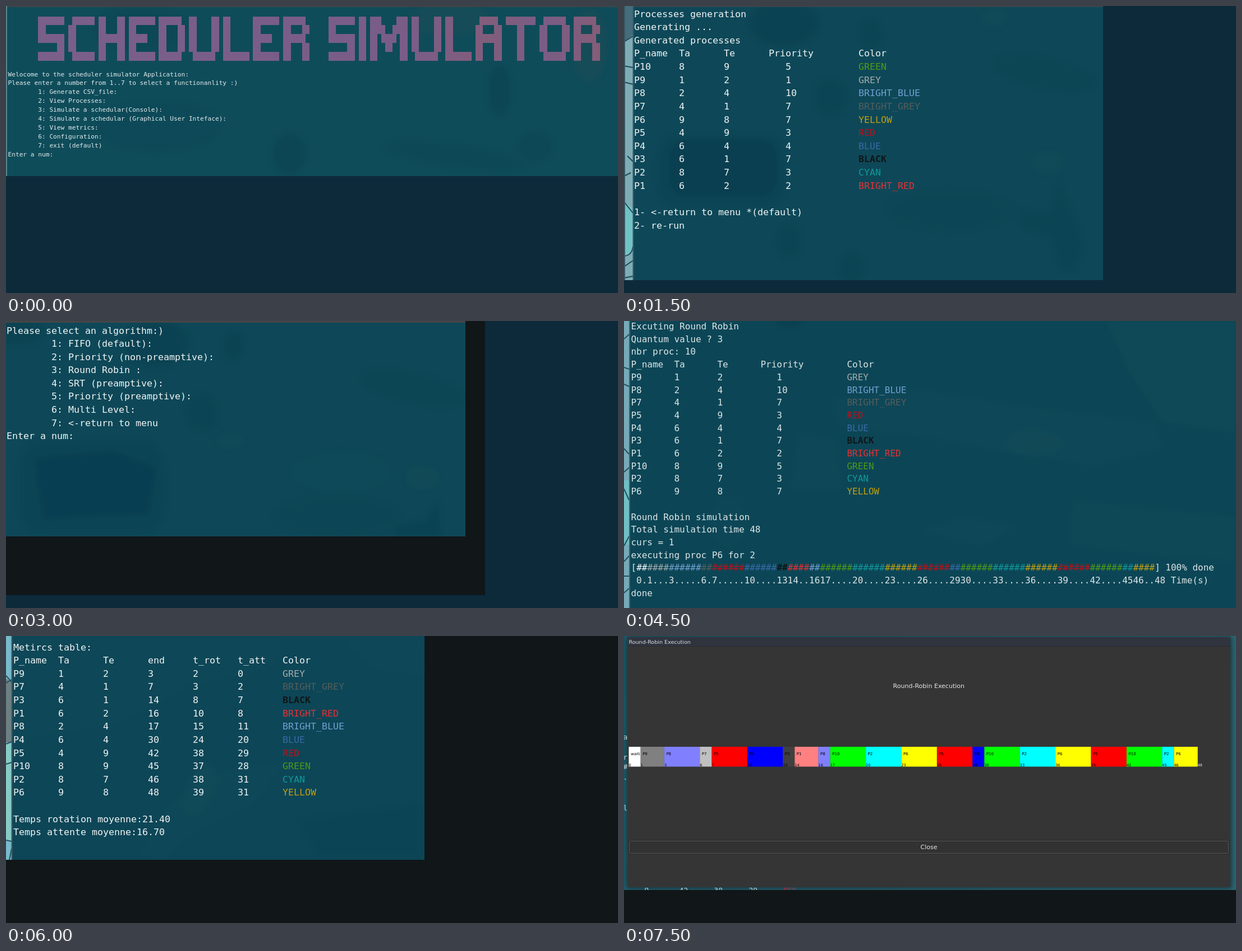
Animation, 1091 px wide and 513 px high, one loop 9 s. Source, as an HTML page:

```html
<!DOCTYPE html>
<html lang="en">
<head>
<meta charset="utf-8">
<title>Scheduler simulator</title>
<style>
  html, body { margin: 0; width: 100%; height: 100%; overflow: hidden; background: #0d2a3b; }
  section {
    position: absolute; left: 0; top: 0; width: 1091px; height: 513px;
    overflow: hidden; background: #0d2a3b;
    animation: show 9s step-end infinite;
    animation-delay: calc((var(--i) - 6) * 1.5s);
  }
  @keyframes show {
    0% { opacity: 1; }
    16.67%, 100% { opacity: 0; }
  }
  svg { position: absolute; left: 0; top: 0; display: block; overflow: hidden; }
  pre {
    position: absolute; margin: 0; color: #f0f5f5;
    font-family: "DejaVu Sans Mono", "Noto Sans Mono", monospace;
    font-size: 16.61px; line-height: 23.63px;
  }
  #menu pre { left: 3.5px; top: 114.5px; font-size: 11.16px; line-height: 15.89px; color: #e2ecec; }
  #generate pre { left: 18px; top: 2.6px; }
  #choose pre { left: 1px; top: 5.6px; line-height: 23.56px; }
  #run pre { left: 12.5px; top: -1px; font-size: 15.99px; line-height: 22.71px; color: #dce6e7; }
  #metrics pre { left: 13px; top: 8.6px; }
  #chart text { font-family: "DejaVu Sans", sans-serif; }
  .soft { filter: blur(4px); }
  g.soft { opacity: .6; }
</style>
</head>
<body>

<section id="menu" style="--i:0">
  <svg width="1091" height="304">
    <defs>
      <linearGradient id="ink">
        <stop offset="0" stop-color="#7a5f89"/>
        <stop offset=".65" stop-color="#795d87"/>
        <stop offset=".8" stop-color="#825d7c"/>
        <stop offset=".9" stop-color="#795d85"/>
        <stop offset="1" stop-color="#855d78"/>
      </linearGradient>
    </defs>
    <rect width="1091" height="304" fill="#0f4c5a"/>
    <g class="soft">
      <ellipse cx="240" cy="42" rx="85" ry="38" fill="#0d4756"/>
      <ellipse cx="270" cy="215" rx="110" ry="42" fill="#0c4857"/>
      <ellipse cx="505" cy="265" rx="30" ry="36" fill="#0b4353"/>
      <ellipse cx="800" cy="268" rx="125" ry="18" fill="#0c4756" transform="rotate(8 800 268)"/>
      <ellipse cx="880" cy="150" rx="20" ry="46" fill="#0b4353"/>
      <ellipse cx="942" cy="252" rx="30" ry="26" fill="#0c4655"/>
      <ellipse cx="790" cy="25" rx="75" ry="30" fill="#1a4d58"/>
      <ellipse cx="1040" cy="70" rx="32" ry="65" fill="#1c4d56"/>
    </g>
    <rect width="1091" height="2" fill="#3c4546"/>
    <rect width="2" height="304" fill="#5b8790"/>
    <path id="title" fill="url(#ink)" shape-rendering="crispEdges"/>
  </svg>
<pre>Welocome to the scheduler simulator Application:
Please enter a number from 1..7 to select a functionanlity :)
        1: Generate CSV_file:
        2: View Processes:
        3: Simulate a schedular(Console):
        4: Simulate a schedular (Graphical User Inteface):
        5: View metrics:
        6: Configuration:
        7: exit (default)
Enter a num:</pre>
</section>

<section id="generate" style="--i:1">
  <svg width="854" height="490">
    <rect width="854" height="490" fill="#0e4858"/>
    <g class="soft">
      <ellipse cx="285" cy="30" rx="62" ry="42" fill="#0a4050"/>
      <ellipse cx="440" cy="50" rx="20" ry="26" fill="#0b4352"/>
      <ellipse cx="368" cy="163" rx="28" ry="32" fill="#0b4352"/>
      <ellipse cx="750" cy="120" rx="90" ry="25" fill="#0c4553" transform="rotate(12 750 120)"/>
      <rect x="62" y="230" width="224" height="130" rx="40" fill="#0b4353"/>
      <rect x="82" y="240" width="190" height="100" rx="28" fill="#073b4c"/>
      <ellipse cx="755" cy="280" rx="28" ry="20" fill="#134b57"/>
      <ellipse cx="660" cy="20" rx="22" ry="16" fill="#134b58"/>
      <path d="M705 365L760 375L775 320L795 360L820 430L800 475L775 465L760 410L710 395Z" fill="#0b4352"/>
      <ellipse cx="295" cy="420" rx="20" ry="30" fill="#0b4352"/>
      <ellipse cx="405" cy="468" rx="22" ry="28" fill="#0b4352"/>
      <ellipse cx="580" cy="365" rx="110" ry="34" fill="#0d4554"/>
    </g>
    <rect width="854" height="2" fill="#36474c"/>
    <path d="M0 0H16V490H0Z" fill="#7eadb6"/>
    <path d="M0 0H16V52L0 64Z" fill="#456d7c"/>
    <path d="M0 350L16 362V440L0 446Z" fill="#72c3c5"/>
    <path d="M0 64L16 54M0 107L16 110M0 136L16 140M6 268L16 278M0 304L12 298M0 350L16 370M0 447Q14 446 16 430M0 466L16 455M0 486L16 483" fill="none" stroke="#1e4857" stroke-width="2"/>
    <path d="M1 0V490M16.5 0V490" stroke="#3b5965" stroke-width="2"/>
  </svg>
  <pre></pre>
</section>

<section id="choose" style="--i:2">
  <svg width="854" height="490">
    <rect width="854" height="490" fill="#111618"/>
    <rect width="819" height="385" fill="#0e4858"/>
    <g class="soft">
      <ellipse cx="268" cy="40" rx="58" ry="42" fill="#0a4050"/>
      <ellipse cx="20" cy="18" rx="50" ry="24" fill="#0a4151"/>
      <ellipse cx="405" cy="45" rx="18" ry="25" fill="#0a4150"/>
      <ellipse cx="350" cy="163" rx="28" ry="32" fill="#0b4352"/>
      <ellipse cx="725" cy="120" rx="92" ry="25" fill="#0c4553" transform="rotate(12 725 120)"/>
      <rect x="25" y="215" width="258" height="164" rx="42" fill="#0b4454"/>
      <path d="M50 245L190 232L268 262L255 345L65 355Z" fill="#063a4d"/>
      <ellipse cx="600" cy="270" rx="88" ry="36" fill="#104b5a"/>
      <ellipse cx="742" cy="280" rx="28" ry="20" fill="#154c57"/>
      <ellipse cx="400" cy="215" rx="24" ry="12" fill="#134b58"/>
      <path d="M690 365L750 358L770 320L776 383H695Z" fill="#094050"/>
      <ellipse cx="590" cy="350" rx="110" ry="34" fill="#0d4554"/>
    </g>
    <path d="M0 385H854V490H0ZM819 0H854V490H819Z" fill="#111618"/>
    <rect width="819" height="3" fill="#434646"/>
  </svg>
<pre>Please select an algorithm:)
        1: FIFO (default):
        2: Priority (non-preamptive):
        3: Round Robin :
        4: SRT (preamptive):
        5: Priority (preamptive):
        6: Multi Level:
        7: &lt;-return to menu
Enter a num:</pre>
</section>

<section id="run" style="--i:3">
  <svg width="1091" height="513">
    <rect width="1091" height="513" fill="#0c4656"/>
    <g class="soft">
      <path d="M860 0H1091V200L960 180L900 90Z" fill="#124c59"/>
      <path d="M370 140L520 120L700 150L950 180L960 230L840 260L700 240L540 210L380 190Z" fill="#104958"/>
      <path d="M310 200L380 210L390 300L295 305Z" fill="#104958"/>
      <ellipse cx="730" cy="218" rx="50" ry="22" fill="#154c58"/>
      <path d="M800 320L1091 350V430L960 420L790 400Z" fill="#104a58"/>
      <path d="M525 375L600 350L705 362L640 405Z" fill="#104958"/>
      <ellipse cx="185" cy="360" rx="35" ry="45" fill="#0f4958"/>
      <ellipse cx="295" cy="3" rx="24" ry="8" fill="#093c4b"/>
    </g>
    <rect width="9" height="513" fill="#77aab8"/>
    <rect y="285" width="9" height="115" fill="#70bfc4"/>
    <path d="M0 32L9 24M0 83L9 86M0 113L9 117M0 228L9 238M0 270L9 262M0 300L9 320M0 402L9 385M0 430L9 420M0 456H9M0 486L9 478" stroke="#24505f" stroke-width="2"/>
    <path d="M10 0V513" stroke="#435f6b" stroke-width="2"/>
  </svg>
  <pre></pre>
</section>

<section id="metrics" style="--i:4">
  <svg width="1091" height="513">
    <rect width="1091" height="513" fill="#111618"/>
    <rect width="746" height="400" fill="#0d4657"/>
    <g class="soft">
      <path d="M10 4H500L480 60L330 90L200 160L15 190Z" fill="#0f4958"/>
      <path d="M240 390L290 300L400 235L500 225L440 300L340 350L280 395Z" fill="#104a59"/>
      <path d="M600 4H742V70L660 60Z" fill="#104a59"/>
      <ellipse cx="345" cy="275" rx="26" ry="50" fill="#124c5a" transform="rotate(25 345 275)"/>
      <path d="M520 330L740 300V394H560Z" fill="#0b4454"/>
    </g>
    <path d="M0 0H10V400H0Z" fill="#78b9cb"/>
    <path d="M0 76L10 82V190H0Z" fill="#6c7f81"/>
    <path d="M0 192H10V366H0Z" fill="#86cbc5"/>
    <path d="M0 71L10 82M0 84L10 78M0 193L10 189M0 229L10 226M0 365L10 367M6 400L10 380" stroke="#24505f" stroke-width="2"/>
    <path d="M10.5 0V400" stroke="#3d5a66" stroke-width="2"/>
  </svg>
  <pre></pre>
</section>

<section id="chart" style="--i:5">
  <svg width="1091" height="513">
    <defs>
      <linearGradient id="desk" x2="1" y2=".3">
        <stop offset="0" stop-color="#1c5867"/>
        <stop offset=".6" stop-color="#255f70"/>
        <stop offset="1" stop-color="#2b6672"/>
      </linearGradient>
    </defs>
    <rect width="1091" height="513" fill="#111618"/>
    <rect width="1091" height="454" fill="url(#desk)"/>
    <rect x="5" y="2" width="1078" height="449" rx="3" fill="#17343c" class="soft"/>
    <svg width="1091" height="454">
      <g id="behind" font-size="12.9"></g>
    </svg>
    <rect y="454" width="1091" height="59" fill="#111618"/>
    <rect x="7" y="2" width="1074" height="447" fill="#353535"/>
    <rect x="7" y="2" width="1074" height="16" fill="#2f343f"/>
    <path d="M7 18.5H1081" stroke="#292c33"/>
    <text x="8.5" y="14" font-size="9.55" fill="#dcdfe2">Round-Robin Execution</text>
    <text x="543.3" y="93" font-size="11.04" fill="#e6e6e6" text-anchor="middle">Round-Robin Execution</text>
    <g id="bars"></g>
    <rect x="8.5" y="365.5" width="1070" height="24" rx="2" fill="none" stroke="#2a2a2a"/>
    <rect x="9.5" y="366.5" width="1068" height="22" rx="2" fill="#323232" stroke="#575757"/>
    <text x="543.6" y="381.3" font-size="11.04" fill="#e6e6e6" text-anchor="middle">Close</text>
  </svg>
</section>

<script>
const $ = sel => document.querySelector(sel);

// Banner: five rows of character cells per letter.
const same = (row, n) => Array(n).fill(row).join('/');
const glyphs = {
  S: '███████/██     /███████/     ██/███████',
  C: ' ██████/' + same('██     ', 3) + '/ ██████',
  H: '██   ██/██   ██/███████/██   ██/██   ██',
  E: '███████/██     /█████  /██     /███████',
  D: '██████ /' + same('██   ██', 3) + '/██████ ',
  U: same('██    ██', 4) + '/ ██████ ',
  L: same('██     ', 4) + '/███████',
  R: '██████ /██   ██/██████ /██   ██/██   ██',
  I: same('██', 5),
  M: '███    ███/████  ████/██ ████ ██/██  ██  ██/██      ██',
  A: ' █████ /██   ██/███████/██   ██/██   ██',
  T: '████████/' + same('   ██   ', 4),
  O: ' ██████ /' + same('██    ██', 3) + '/ ██████ ',
  ' ': same('   ', 5)
};
const cellW = 6.72, cellH = 15.89;
let banner = '';
for (let row = 0; row < 5; row++) {
  const line = [...'SCHEDULER SIMULATOR'].map(c => glyphs[c].split('/')[row]).join(' ');
  for (const run of line.matchAll(/█+/g)) {
    const w = run[0].length * cellW;
    banner += `M${57.3 + run.index * cellW} ${18.5 + row * cellH}h${w}v${cellH}h${-w}z`;
  }
}
$('#title').setAttribute('d', banner);

// name, arrival, execution time, priority, colour name
const procs = [
  ['P10', 8, 9, 5, 'GREEN'], ['P9', 1, 2, 1, 'GREY'], ['P8', 2, 4, 10, 'BRIGHT_BLUE'],
  ['P7', 4, 1, 7, 'BRIGHT_GREY'], ['P6', 9, 8, 7, 'YELLOW'], ['P5', 4, 9, 3, 'RED'],
  ['P4', 6, 4, 4, 'BLUE'], ['P3', 6, 1, 7, 'BLACK'], ['P2', 8, 7, 3, 'CYAN'],
  ['P1', 6, 2, 2, 'BRIGHT_RED']
].map(([name, ta, te, prio, color]) => ({ name, ta, te, prio, color }));

const ansi = {
  GREEN: '#4e9a16', GREY: '#a3abab', BRIGHT_BLUE: '#729fcf', BRIGHT_GREY: '#555d5b',
  YELLOW: '#c0a010', RED: '#c01018', BLUE: '#3869a6', BLACK: '#101618',
  CYAN: '#10999b', BRIGHT_RED: '#ea2f31', WHITE: '#ffffff'
};
const fills = {
  waiti: '#fff', P9: '#808080', P8: '#8080ff', P7: '#c0c0c0', P5: '#f00', P4: '#00f',
  P3: '#404040', P1: '#ff8080', P10: '#0f0', P2: '#0ff', P6: '#ff0'
};

let clock = 0;
const slots = ('waiti:1 P9:2 P8:3 P7:1 P5:3 P4:3 P3:1 P1:2 P8:1 P10:3 P2:3 P6:3 ' +
  'P5:3 P4:1 P10:3 P2:3 P6:3 P5:3 P10:3 P2:1 P6:2').split(' ').map(s => {
  const [name, len] = s.split(':');
  const slot = { name, start: clock, len: +len };
  clock += slot.len;
  return slot;
});
for (const p of procs) {
  const last = slots.filter(s => s.name === p.name).pop();
  p.end = last.start + last.len;
  p.rot = p.end - p.ta;
  p.att = p.rot - p.te;
}

const paint = (text, color) =>
  `<span style="color:${ansi[color]}${color === 'BLACK' ? ';font-weight:bold' : ''}">${text}</span>`;
const cols = list => list.map(v => String(v).padEnd(8)).join('');
const listing = rows => [
  cols(['P_name', 'Ta', 'Te', 'Priority', '']) + 'Color',
  ...rows.map(p => cols([p.name, p.ta, p.te, '   ' + p.prio, '']) + paint(p.color, p.color))
];
const by = key => [...procs].sort((a, b) => a[key] - b[key]);
const mean = key => (procs.reduce((sum, p) => sum + p[key], 0) / procs.length).toFixed(2);
const print = (id, lines) => { $(`#${id} pre`).innerHTML = lines.join('\n'); };

print('generate', [
  'Processes generation', 'Generating ...', 'Generated processes',
  ...listing(procs), '', '1- &lt;-return to menu *(default)', '2- re-run'
]);

const colorOf = name => (procs.find(p => p.name === name) || { color: 'WHITE' }).color;
print('run', [
  'Excuting Round Robin', 'Quantum value ? 3', 'nbr proc: 10',
  ...listing(by('ta')), '',
  'Round Robin simulation', `Total simulation time ${clock}`, 'curs = 1', 'executing proc P6 for 2',
  '[' + slots.map(s => paint('#'.repeat(2 * s.len), colorOf(s.name))).join('') + '] 100% done',
  ' ' + slots.map(s => String(s.start).padEnd(2 * s.len, '.')).join('') + clock + ' Time(s)',
  'done'
]);

print('metrics', [
  'Metircs table:',
  cols(['P_name', 'Ta', 'Te', 'end', 't_rot', 't_att']) + 'Color',
  ...by('end').map(p => cols([p.name, p.ta, p.te, p.end, p.rot, p.att]) + paint(p.color, p.color)),
  '', `Temps rotation moyenne:${mean('rot')}`, `Temps attente moyenne:${mean('att')}`
]);

// Gantt chart
const unit = 21.13, left = 8.5;
const label = (x, y, text, size, fill = '#000') =>
  `<text x="${x}" y="${y}" font-size="${size}" fill="${fill}">${text}</text>`;
$('#bars').innerHTML = slots.map(s => {
  const x = left + s.start * unit;
  return `<rect x="${x}" y="198" width="${s.len * unit}" height="35.5" fill="${fills[s.name]}"/>` +
    label(x + 3.5, 212.6, s.name, 7) + label(x, 233.2, s.start, 6.5);
}).join('') + label(left + clock * unit, 233.2, clock, 6.5, '#e6e6e6');

// Terminal text peeking out around the window
const peek = (x, y, text, fill = '#c3d2d4') =>
  `<text x="${x}" y="${y}" fill="${fill}" style="font-family:'DejaVu Sans Mono',monospace">${text}</text>`;
$('#behind').innerHTML =
  [['a', 185], ['r', 221], ['#', 238], ['.', 257], ['l', 312]].map(([c, y]) => peek(-1.5, y, c)).join('') +
  ['9', '42', '38', '29'].map((n, i) => peek(36.5 + 62 * i, 458.5, n)).join('') +
  peek(284.5, 458.5, 'RED', '#a8323c') +
  peek(36, 0, '_') + peek(222, 0, 'BRIGHT_GREY', '#64787c');
</script>
</body>
</html>
```
